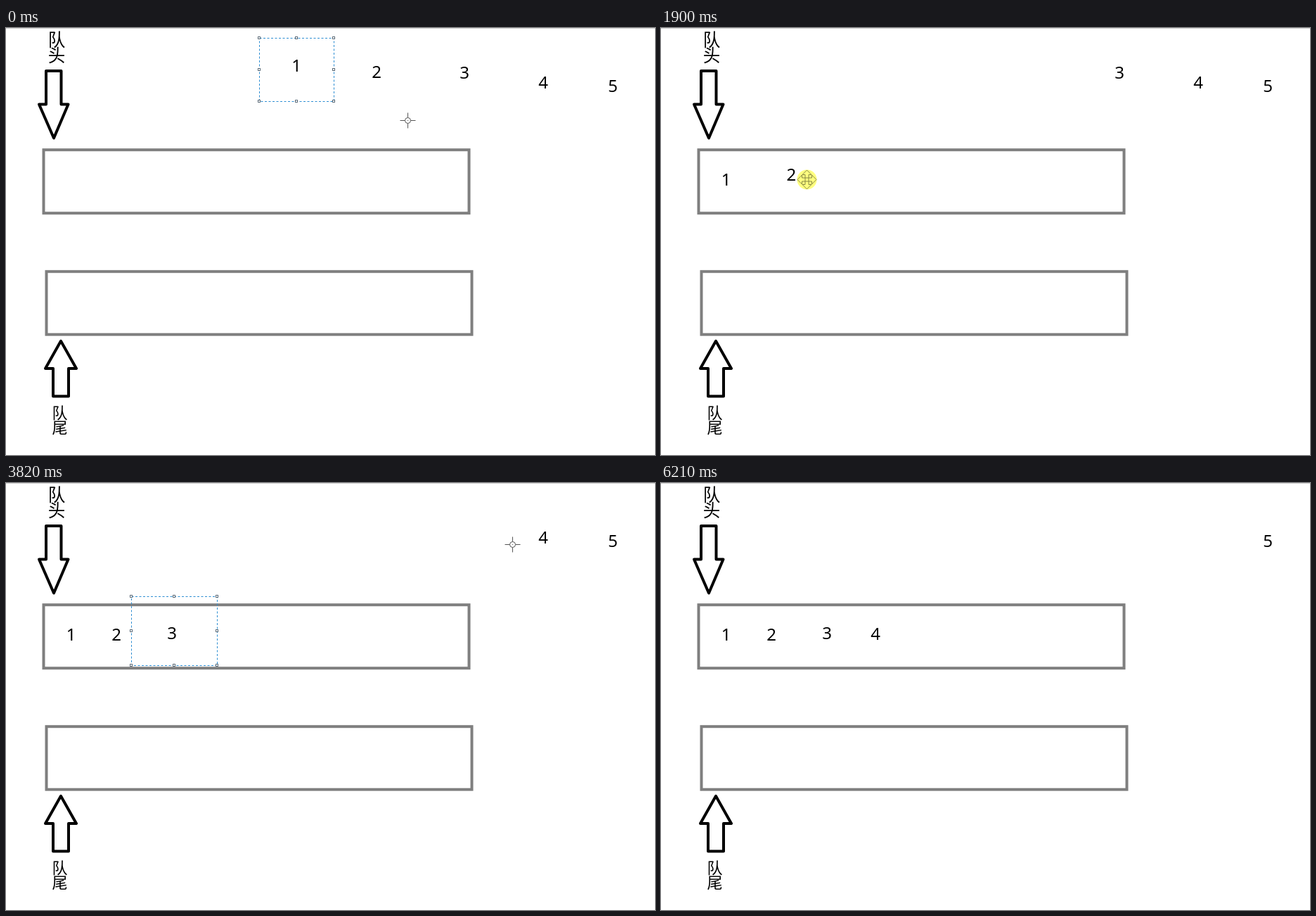
An HTML page that plays this animation: 923x607 px, repeating every 6.41 s.

```html
<!DOCTYPE html>
<html lang="zh">
<head>
<meta charset="utf-8">
<title>队列</title>
<style>
  html, body { margin: 0; width: 100%; height: 100%; overflow: hidden; background: #fff; }
  svg { display: block; width: 923px; height: 607px; }
  text { text-anchor: middle; fill: #000; }
  .digit { font: 24px "Noto Sans", "Open Sans", sans-serif; }
  .cjk { font-family: "Noto Sans CJK SC", "Noto Sans CJK", sans-serif; }
  .queue { fill: none; stroke: #7f7f7f; stroke-width: 4; }
  .arrow { fill: #fff; stroke: #000; stroke-width: 4; stroke-linejoin: round; }
  .grip { fill: #fff; stroke: #5c6b78; }
  #cross { fill: none; stroke: #555; }
  #move { fill: #fff; stroke: #888; }
  #glow { fill: #ffff80; mix-blend-mode: multiply; }
</style>
</head>
<body>
<svg viewBox="0 0 923 607">
  <path d="M0 .5H923" stroke="#d0d0d0"/>
  <g class="cjk" font-size="24.5">
    <text x="72" y="26">队</text>
    <text x="72" y="47.5">头</text>
  </g>
  <g class="cjk" font-size="22">
    <text x="76.5" y="554.5">队</text>
    <text x="76.5" y="576">尾</text>
  </g>
  <path class="arrow" d="M57 61H78.5V108.5H88.5L68 156.5L47 108.5H57Z"/>
  <path class="arrow" d="M78 445L100 484H89V523.5H67V484H56Z"/>
  <rect class="queue" x="53.5" y="173.2" width="605" height="90"/>
  <rect class="queue" x="57.5" y="346.2" width="605" height="89.5"/>
  <g id="digits"></g>
  <rect id="frame" fill="none"/>
  <g id="grips"></g>
  <g id="pointer">
    <g id="cross">
      <circle r="4"/>
      <path d="M-11 0H-4M4 0H11M0 -11V-4M0 4V11M-.5 0H.5"/>
    </g>
    <g id="move"></g>
    <circle id="glow" r="14"/>
  </g>
</svg>
<script>
const LOOP = 6410, DESELECT = 6210;
const PAUSE = 20;    // stillness around each press and release
const REACH = 85;    // from the end of framing to the grab

const $ = id => document.getElementById(id);
const show = (el, on) => { el.style.display = on ? "" : "none"; };

function set(el, attrs) {
  for (const k in attrs) el.setAttribute(k, attrs[k]);
}
function add(parent, tag, attrs) {
  const el = document.createElementNS("http://www.w3.org/2000/svg", tag);
  set(el, attrs);
  return parent.appendChild(el);
}

// Each digit is framed from press on, dragged from grab to drop.
// hold: pointer relative to the digit; via: points that bend the pointer's way.
const items = [
  { home: [412, 53], dest: [91.5, 215.5], hold: [1, 18], box: [360, 14, 466, 104],
    press: -REACH, grab: 205, drop: 680, via: [] },
  { home: [526, 62], dest: [156, 215], hold: [23, 7], box: [471, 20, 605, 114],
    press: 1290, grab: 1615, drop: 2000, via: [[1190, 444, 20], [1690, 475, 120], [1900, 208, 215]] },
  { home: [651, 63], dest: [235, 213], hold: [12, -3], box: [594, 11, 716, 109],
    press: 2600, grab: 2935, drop: 3420, via: [[3030, 550, 120], [3210, 397, 195]] },
  { home: [763, 77], dest: [304, 214], hold: [15, 8], box: [717, 38, 816, 125],
    press: 4175, grab: 4785, drop: 5375, via: [[3930, 789, 59], [4440, 796, 125], [4930, 588, 163], [5290, 323, 221]] },
  { home: [862, 82] }
];
const queued = items.filter(it => it.dest);
const plus = (a, b) => a.map((v, c) => v + b[c]);

// The pointer's way follows from what is done to each digit.
const path = [[0, 571, 131], [30, 571, 131], [5820, 945, 245]];
function rest(t, [x, y]) {
  path.push([t - PAUSE, x, y], [t + PAUSE, x, y]);
}
queued.forEach((it, i) => {
  const next = queued[i + 1];
  it.clear = next ? next.press : DESELECT;
  it.release = i ? it.grab - REACH : 0;
  if (i) {
    rest(it.press, it.box.slice(0, 2));
    rest(it.release, it.box.slice(2));
  }
  rest(it.grab, plus(it.home, it.hold));
  rest(it.drop, plus(it.dest, it.hold));
  path.push(...it.via);
});
path.sort((a, b) => a[0] - b[0]);

const slope = (i, c) => (path[i + 1][c] - path[i][c]) / (path[i + 1][0] - path[i][0]);
function tangent(i, c) {
  if (i === 0 || i === path.length - 1) return 0;
  const a = slope(i - 1, c), b = slope(i, c);
  return a * b > 0 ? 2 * a * b / (a + b) : 0;
}

// Monotone cubic through the path, so pauses stay still.
function pointerAt(t) {
  const last = path.length - 1;
  if (t >= path[last][0]) return path[last].slice(1);
  let i = 0;
  while (path[i + 1][0] <= t) i++;
  const dt = path[i + 1][0] - path[i][0], u = (t - path[i][0]) / dt;
  return [1, 2].map(c => {
    const p = path[i][c], q = path[i + 1][c];
    return p + (q - p) * u * u * (3 - 2 * u)
      + dt * u * (1 - u) * ((1 - u) * tangent(i, c) - u * tangent(i + 1, c));
  });
}

items.forEach((it, i) => {
  it.el = add($("digits"), "text", { class: "digit" });
  it.el.textContent = i + 1;
});
const grips = [];
for (const gx of [0, .5, 1]) for (const gy of [0, .5, 1]) {
  if (gx === .5 && gy === .5) continue;
  grips.push({ gx, gy, el: add($("grips"), "rect", { class: "grip", width: 3, height: 3 }) });
}
for (let a = 0; a < 360; a += 90) {
  add($("move"), "path", {
    d: "M0 -13.5L6.5 -7H2.5V-2.5H-2.5V-7H-6.5Z", transform: `rotate(${a})`
  });
}

function placeOf(it, t, p) {
  if (!it.dest || t < it.grab) return it.home;
  if (t >= it.drop) return it.dest;
  return p.map((v, c) => v - it.hold[c]);
}

function drawFrame(box, live) {
  const [x, y, r, b] = box.map(v => Math.floor(v) + .5);
  set($("frame"), {
    x, y, width: Math.max(0, r - x), height: Math.max(0, b - y),
    stroke: live ? "#111" : "#2f8fd3", "stroke-dasharray": "3 2.5"
  });
  for (const g of grips) {
    set(g.el, {
      x: Math.floor(x + (r - x) * g.gx) - 1.5,
      y: Math.floor(y + (b - y) * g.gy) - 1.5
    });
  }
}

function render(t) {
  const p = pointerAt(t);
  for (const it of items) {
    const [x, y] = placeOf(it, t, p);
    set(it.el, { x: x + 1, y: y + 8.5 });
  }

  const it = queued.find(d => t >= d.press && t < d.clear);
  const framing = !!it && t < it.release;
  const dragging = !!it && t >= it.grab && t < it.drop;
  const selected = !!it && !framing && !dragging;
  let inside = false;
  if (framing) drawFrame([...it.box.slice(0, 2), ...p], true);
  if (selected) {
    const at = placeOf(it, t, p);
    const box = it.box.map((v, k) => v + at[k % 2] - it.home[k % 2]);
    drawFrame(box, false);
    inside = p[0] > box[0] && p[0] < box[2] && p[1] > box[1] && p[1] < box[3];
  }
  show($("frame"), framing || selected);
  show($("grips"), selected);

  const moving = dragging || inside;
  show($("cross"), !moving);
  show($("move"), moving);
  show($("glow"), framing || dragging);
  const [x, y] = p.map(v => Math.floor(v) + .5);
  set($("pointer"), { transform: `translate(${x} ${y})` });
}

const start = performance.now();
function tick() {
  render((performance.now() - start) % LOOP);
  requestAnimationFrame(tick);
}
tick();
</script>
</body>
</html>
```
